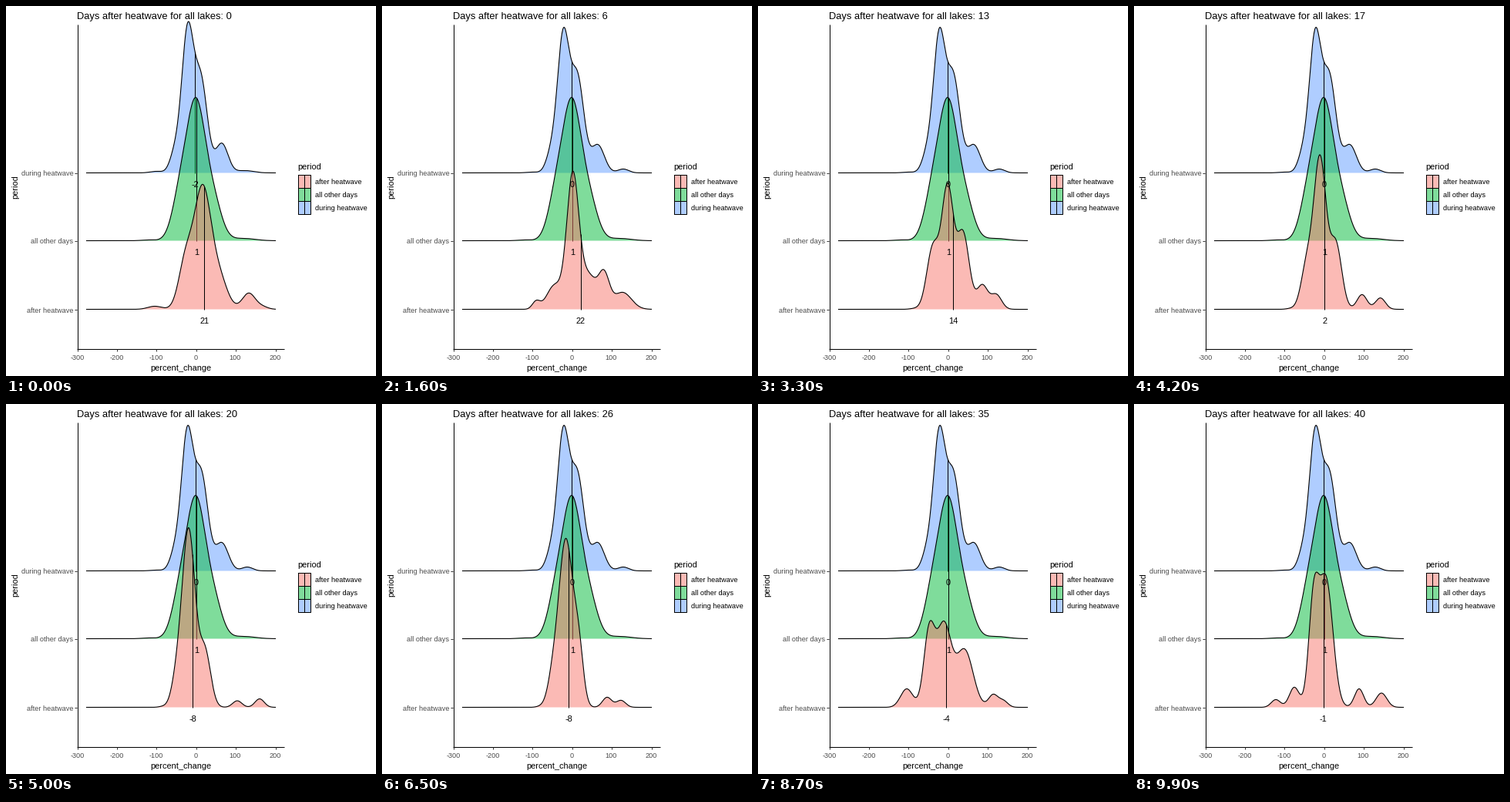
These frames come from a looping animation (480x480 px, 10 s). A matplotlib script:

```python
import numpy as np
import matplotlib.pyplot as plt
from matplotlib.animation import FuncAnimation

plt.rcParams["font.family"] = "Liberation Sans"

FRAMES, DAYS, STEP = 100, 40, 0.1
PX = 0.72                     # points per pixel at 100 dpi
ZERO, UNIT = 246.3, 0.514     # pixel position of 0 % and pixels per percent
X = np.linspace(104, 350, 493)
RED, GREEN, BLUE = "#F8766D", "#00BA38", "#619CFF"
GREY, TICK = "#4D4D4D", "#333333"

# A ridge is a sum of bell curves (centre, height, width), in pixels.
# Each track maps a time in seconds to (centre value in percent, bells).
DURING = {
    0: (-2, [(195, 2, 8), (219, 24, 6.5), (235.5, 181, 7.7),
             (253, 117, 8.3), (280, 38, 8), (310, 3, 11)]),
    0.25: (0, [(195, 1, 8), (219, 22, 6.5), (235, 175, 7.7),
               (253.5, 122, 8.5), (280, 36, 8.5), (313, 5, 7)]),
}
OTHER = {
    0: (1, [(185, 1, 9), (226, 54, 10.5), (246.5, 172, 12),
            (269, 47, 11), (308, 3, 15)]),
}
AFTER = {
    0: (21, [(193, 4, 9), (233, 60, 9), (255, 155, 11),
             (277, 37, 10.5), (315, 21, 8.5), (333, 3, 7)]),
    1.6: (22.4, [(200, 10, 5), (224, 31, 10), (247.5, 172, 7.8),
                 (268, 43, 10), (288, 43, 7), (312, 22, 11.5)]),
    3.3: (14, [(203, 1, 6), (227, 80, 8), (246, 155, 7.5),
               (266, 98, 8), (291, 31, 7), (309, 19, 7)]),
    5: (-8.4, [(203, 1, 5), (222, 36, 7), (237, 228, 8.3),
               (258, 72, 7.5), (300, 8.5, 6), (329, 11, 6)]),
    6.5: (-8, [(205, 1, 5), (222, 36, 7), (238.5, 215, 9),
               (255, 70, 6.2), (292, 13, 6), (310, 9, 6)]),
    8.7: (-4, [(193, 24, 8), (222, 95, 7), (241, 106, 9.5),
               (268, 74, 11), (305, 16, 6), (318, 8.5, 6)]),
    9.9: (-1, [(184, 10, 6), (208, 26, 6.5), (233, 130, 6.5),
               (249, 165, 9), (292, 24, 6), (321, 18.5, 7)]),
}


def sample(track, t):
    """Curve heights on X and centre value at time t."""
    times = list(track)
    poses = np.array([[v, *np.ravel(bells)] for v, bells in track.values()])
    value, *rest = [np.interp(t, times, column) for column in poses.T]
    c, h, w = np.reshape(rest, (-1, 3)).T[:, :, None]
    return (h * np.exp(-((X - c) / w) ** 2 / 2)).sum(axis=0), value


fig = plt.figure(figsize=(4.8, 4.8), dpi=100, facecolor="white")
ax = fig.add_axes([0, 0, 1, 1])
ax.set(xlim=(0, 480), ylim=(480, 0))
ax.axis("off")


def text(x, y, s, size, color="black", ha="left", va="baseline", **kw):
    return ax.text(x, y, s, fontsize=size * PX, color=color, ha=ha, va=va, **kw)


def line(x, y, color="black", z=1, snap=True, width=1):
    return ax.plot(x, y, color=color, lw=width * PX, snap=snap,
                   solid_capstyle="butt", zorder=z)[0]


class Ridge:
    def __init__(self, base, color, track, z):
        self.base, self.track = base, track
        self.fill = ax.fill([0, 1, 1], [0, 0, 1], color=color, alpha=0.5,
                            lw=0, zorder=z)[0]
        self.mark = line([], [], z=z + 0.1)
        self.edge = line([], [], z=z + 0.2, snap=False, width=1.1)
        self.label = text(0, base + 18.5, "", 11, ha="center", zorder=9)

    def draw(self, t):
        h, value = sample(self.track, t)
        top = self.base - h
        ends = [[X[-1], self.base], [X[0], self.base]]
        self.fill.set_xy(np.vstack([np.column_stack([X, top]), ends]))
        self.edge.set_data(X, top)
        x = ZERO + UNIT * value
        self.mark.set_data([x, x], [self.base, np.interp(x, X, top)])
        self.label.set_x(x)
        self.label.set_text(str(int(round(value))))


# Axes
line([92.5, 92.5], [24, 445])
line([92, 361], [444.5, 444.5])
for v in range(-300, 201, 100):
    x = np.floor(ZERO + UNIT * v) + 0.5
    line([x, x], [445, 448], TICK)
    text(x, 459, str(v), 9.2, GREY, "center")
text(226.5, 473, "percent_change", 11, ha="center")
text(12.5, 234.5, "period", 11, ha="center", va="center", rotation=90)
title = text(92, 17, "", 12.85)

# Ridges and legend, listed from top to bottom of the legend
text(378, 212, "period", 11)
ridges = []
for k, (name, base, color, track) in enumerate([
        ("after heatwave", 393.5, RED, AFTER),
        ("all other days", 304.5, GREEN, OTHER),
        ("during heatwave", 216.5, BLUE, DURING)]):
    line([89, 92], [base, base], TICK)
    text(87.3, base + 4, name, 9.2, GREY, "right")
    ridges.append(Ridge(base, color, track, z=4 - k))

    y = 218.5 + 17 * k
    box_x, box_y = [378.5, 394.5, 394.5, 378.5], [y, y, y + 17, y + 17]
    ax.fill(box_x, box_y, color=color, alpha=0.5, lw=0)
    line(box_x + box_x[:1], box_y + box_y[:1])
    line([386.5, 386.5], [y, y + 17])
    text(401, y + 12.5, name, 9.2)


def update(f):
    day = round(f * DAYS / (FRAMES - 1))
    title.set_text(f"Days after heatwave for all lakes: {day}")
    for r in ridges:
        r.draw(f * STEP)
    return []


anim = FuncAnimation(fig, update, frames=FRAMES, interval=1000 * STEP,
                     init_func=lambda: update(0), repeat=True, repeat_delay=0)
plt.show()
```
